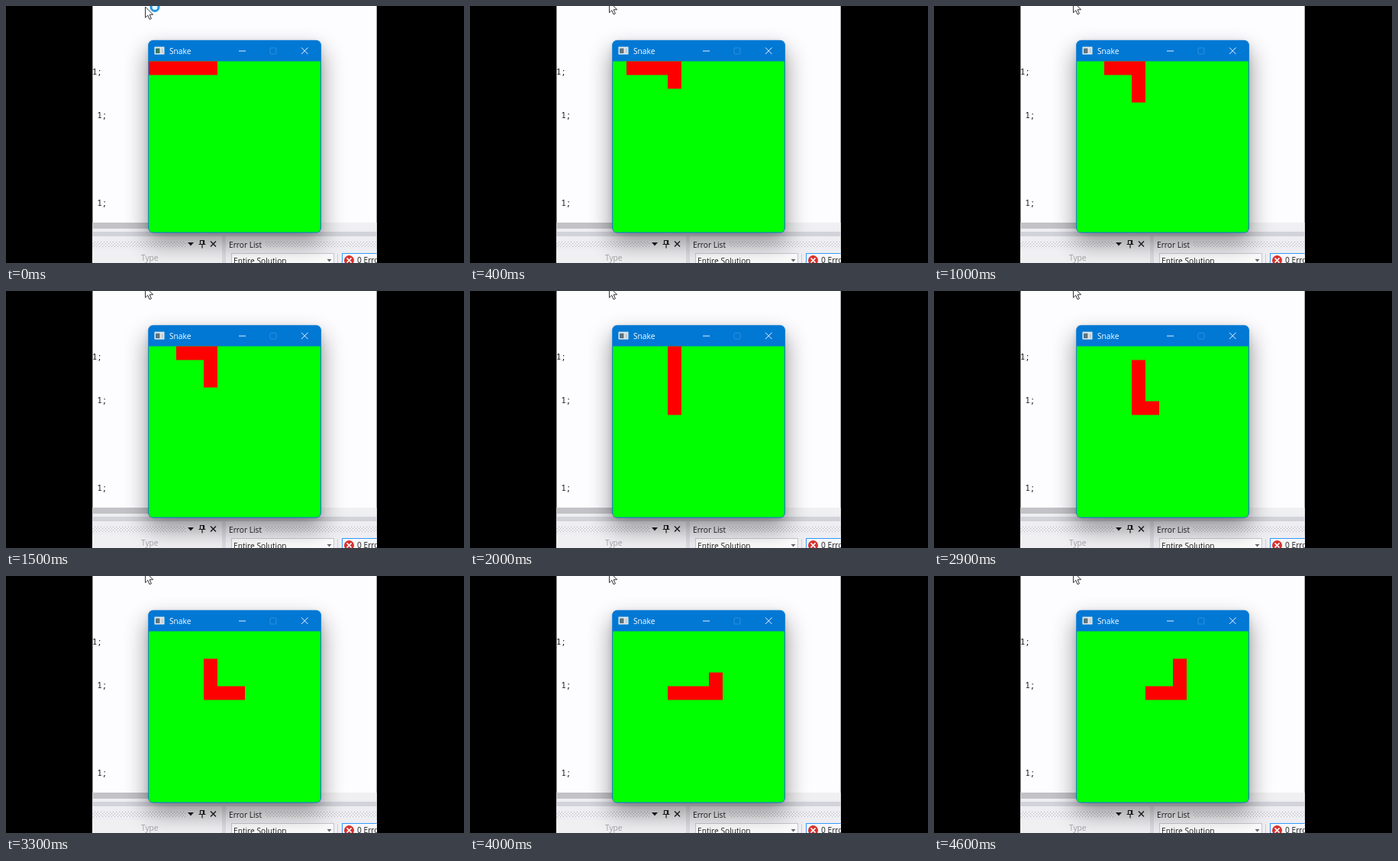
An HTML page that plays this animation: 600 by 337 pixels, repeating every 4800 ms.

```html
<!DOCTYPE html>
<html lang="en">
<head>
<meta charset="utf-8">
<title>Snake</title>
<style>
  html, body { margin: 0; width: 100%; height: 100%; overflow: hidden; background: #000; }
  svg { display: block; width: 100%; height: 100%; }
  text { font: 10.2px "Open Sans", "Noto Sans", sans-serif; fill: #1e1e1e; }
  .code { font: 500 10.5px "Noto Sans Mono", "DejaVu Sans Mono", monospace; fill: #111; }
  .title { font-weight: 500; fill: #fff; }
</style>
</head>
<body>
<svg viewBox="0 0 600 337">
  <defs>
    <clipPath id="view"><rect x="113.400" width="372.300" height="337"/></clipPath>
    <filter id="wide" x="-40%" y="-40%" width="180%" height="180%"><feGaussianBlur stdDeviation="15"/></filter>
    <filter id="near" x="-10%" y="-10%" width="120%" height="120%"><feGaussianBlur stdDeviation="3"/></filter>
    <filter id="soft" x="-10%" y="-10%" width="120%" height="120%" color-interpolation-filters="sRGB">
      <feGaussianBlur stdDeviation=".45"/>
    </filter>
    <pattern id="grip" width="4" height="4" patternUnits="userSpaceOnUse" y="309">
      <path d="M0 0h1v1h-1zM2 2h1v1h-1z" fill="#b4b4bc"/>
    </pattern>
  </defs>
  <rect width="600" height="337"/>
  <g clip-path="url(#view)">
    <rect x="113" width="373" height="337" fill="#fdfcfe"/>
    <text class="code" x="113" y="90.300">1;</text>
    <text class="code" x="119.500" y="147.300">1;</text>
    <text class="code" x="119.500" y="262.300">1;</text>
    <rect x="113" y="284" width="373" height="9" fill="#f0f0f3"/>
    <rect x="113" y="284" width="120" height="8" fill="#c3c3c7"/>
    <rect x="113" y="293" width="373" height="44" fill="#eeeef2"/>
    <rect x="113" y="296" width="373" height="6" fill="#d2d3da"/>

    <!-- left tool pane -->
    <rect x="113" y="302" width="170" height="35" fill="#eeeef2"/>
    <rect x="113" y="309" width="123" height="7" fill="url(#grip)"/>
    <path d="M238 310h8l-4 4.500z" fill="#1e1e1e"/>
    <path d="M254.500 307.500h5v5h-5zM258.500 307.500v5M252.500 312.500h9M257 313v4.500" fill="none" stroke="#1e1e1e" stroke-width="1.2"/>
    <path d="M268 308.500l7 7m0-7l-7 7" stroke="#1e1e1e" stroke-width="1.4"/>
    <rect x="113" y="320" width="170" height="17" fill="#f0f0f3"/>
    <text x="177" y="334.300" style="fill:#a2a2a6">Type</text>

    <!-- right tool pane -->
    <rect x="283" y="302" width="5" height="35" fill="#dcdde3"/>
    <text x="292" y="316.500">Error List</text>
    <rect x="339" y="309" width="147" height="7" fill="url(#grip)"/>
    <rect x="288" y="320" width="198" height="17" fill="#eeeef2"/>
    <rect x="295.500" y="324.500" width="134" height="16" fill="#fbfbfc" stroke="#c6c7cf"/>
    <text x="298" y="337.600">Entire Solution</text>
    <path d="M420.500 332h6l-3 3.500z" fill="#666"/>
    <path d="M434.500 325v12" stroke="#cfd0d8"/>
    <rect x="440.500" y="324.500" width="60" height="16" fill="#f7f7fa" stroke="#3399ff"/>
    <circle cx="449.500" cy="333.500" r="6.500" fill="#d8322c"/>
    <path d="M446.500 330.500l6 6m0-6l-6 6" stroke="#fff" stroke-width="1.7"/>
    <text x="460" y="337.300">0 Errors</text>

    <!-- game window -->
    <rect x="184" y="58" width="231" height="254" rx="8" opacity=".38" filter="url(#wide)"/>
    <rect x="186" y="47" width="227" height="251" rx="7" opacity=".1" filter="url(#near)"/>
    <g filter="url(#soft)">
      <rect x="186.200" y="44.800" width="226.700" height="252.700" rx="6.500" fill="#0078d4"/>
      <path d="M187.200 72.500h224.600v218.500q0 5.500-5.500 5.500h-213.600q-5.500 0-5.500-5.500z" fill="#0f0"/>
      <path id="snake" fill="#f00"/>
    </g>
    <rect x="194.500" y="53.500" width="13" height="10" fill="#e4e9ec"/>
    <rect id="glyph" x="196" y="55.500" width="5.500" height="6.500"/>
    <rect x="203.500" y="55.500" width="2.500" height="6.500" fill="#c2cbd2"/>
    <text class="title" x="214" y="62.800">Snake</text>
    <path d="M305 59h9" stroke="#e6f2fb" stroke-width="1.1"/>
    <rect x="346" y="55" width="8" height="8" rx="1" fill="none" stroke="#2f90dc"/>
    <path d="M387 54.500l8.500 8.500m0-8.500l-8.500 8.500" stroke="#e6f2fb" stroke-width="1"/>

    <!-- pointer -->
    <g id="pointer">
      <path d="M0 0v14.300l3.300-3.100 2.300 5.300 2.300-1-2.300-5.200h4.500z" fill="#fff" stroke="#333" stroke-linejoin="round"/>
      <circle id="busy" cx="12.500" cy="0.500" r="5" fill="#eaf6ff" stroke="#209be6" stroke-width="3"/>
    </g>
  </g>
</svg>
<script>
  const LOOP = 4800, CELL = 18, LENGTH = 5;
  const LEFT = 187, TOP = 72.5;
  const STEPS = [400, 1000, 1600, 2000, 2500, 3000, 3600, 4000, 4600];
  const LEGS = [[1, 0, 4], [0, 1, 4], [1, 0, 3], [0, -1, 2]];
  const el = id => document.getElementById(id);

  // The trail holds every cell the head visits.
  const trail = [[0, 0]];
  for (const [dx, dy, count] of LEGS) {
    for (let i = 0; i < count; i++) {
      const [x, y] = trail[trail.length - 1];
      trail.push([x + dx, y + dy]);
    }
  }

  const cellPath = ([x, y]) =>
    `M${LEFT + x * CELL} ${TOP + y * CELL}h${CELL}v${CELL}h${-CELL}z`;

  function draw(t) {
    const step = STEPS.filter(s => s <= t).length;
    const loading = t < 100;
    el("snake").setAttribute("d", trail.slice(step, step + LENGTH).map(cellPath).join(""));
    el("pointer").setAttribute("transform", `translate(182.5 ${loading ? 1 : -5.5})`);
    el("busy").setAttribute("visibility", loading ? "visible" : "hidden");
    el("glyph").setAttribute("fill", loading ? "#3c7565" : "#5d7480");
  }

  const start = performance.now();
  function tick() {
    draw((performance.now() - start) % LOOP);
    requestAnimationFrame(tick);
  }
  draw(0);
  requestAnimationFrame(tick);
</script>
</body>
</html>
```
